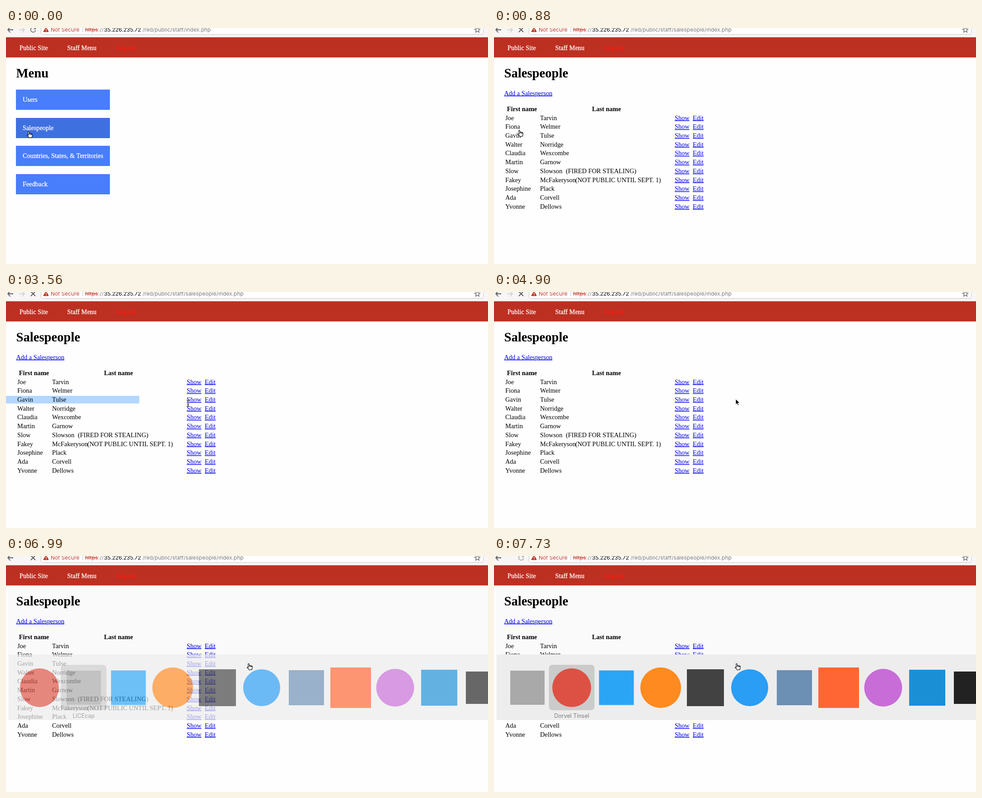
Recreate the animation shown at these times as an HTML page. Size 1067 by 525 pixels, loop 8000 ms.

```html
<!DOCTYPE html>
<html lang="en">
<head>
<meta charset="utf-8">
<title>Staff menu</title>
<style>
  html, body { margin: 0; width: 100%; height: 100%; overflow: hidden; background: #fefefe; }
  svg { display: block; width: 100vw; height: 100vh; }
  text { white-space: pre; }
  .page { font: 14.33px "Liberation Serif", serif; }
  .page .title { font-size: 28.67px; font-weight: bold; }
  .page .head { font-weight: bold; text-anchor: middle; }
  .page .link { fill: #00e; text-decoration: underline; }
  .page .bright { fill: #fff; stroke: #fff; stroke-width: .3px; }
  .bar { font: 12px Inter, sans-serif; }
  .label { font: 12.5px Inter, sans-serif; fill: #7d7d7d; text-anchor: middle; }
</style>
</head>
<body>
<svg id="stage" viewBox="0 0 1067 525" preserveAspectRatio="none"></svg>
<script>
const LOOP = 8000;
const stage = document.getElementById('stage');

function add(parent, tag, attrs = {}, content) {
  const el = document.createElementNS('http://www.w3.org/2000/svg', tag);
  for (const key in attrs) el.setAttribute(key, attrs[key]);
  if (content !== undefined) el.textContent = content;
  return parent.appendChild(el);
}
const group = (parent, attrs) => add(parent, 'g', attrs);
const write = (parent, x, y, content, attrs) => add(parent, 'text', { x, y, ...attrs }, content);
const rect = (parent, x, y, width, height, fill, attrs) =>
  add(parent, 'rect', { x, y, width, height, fill, ...attrs });
const line = (parent, d, stroke, width = 1.8) =>
  add(parent, 'path', { d, stroke, 'stroke-width': width, fill: 'none' });
const show = (el, visible) => el.setAttribute('visibility', visible ? 'inherit' : 'hidden');
const move = (el, x, y) => el.setAttribute('transform', `translate(${x} ${y})`);

rect(stage, 0, 0, 1067, 525, '#fefefe');
const tint = rect(stage, 4, 66, 1063, 299, '#fafafa');

// Browser toolbar
const bar = group(stage, { class: 'bar' });
rect(bar, 0, 0, 1067, 20, '#f6f6f6');
rect(bar, 0, 20, 1067, 1, '#c2b4b2');
rect(bar, 77.5, -10, 979, 24.5, '#fff', { rx: 3, stroke: '#c4c4c4' });
line(bar, 'M16 4H4M9.5-2L4 4l5.500 6', '#555');
const forward = line(bar, 'M29 4H41M35.500-2L41 4l-5.500 6', '#d0d0d0');
const reload = group(bar);
line(reload, 'M64.500 0.500A5.500 5.500 0 1 0 65.500 5', '#777');
add(reload, 'path', { d: 'M66-2V3H61Z', fill: '#777' });
const stop = line(bar, 'M55-1L65 9M65-1L55 9', '#555');
add(bar, 'path', { d: 'M88.500-3L95 9H82Z', fill: '#c53929' });
rect(bar, 88, 1, 1.3, 4, '#fff');
rect(bar, 88, 6.3, 1.3, 1.3, '#fff');
write(bar, 99, 8, 'Not Secure', { fill: '#c53929' });
rect(bar, 169, -3, 1, 13, '#bbb');
write(bar, 175, 8, 'https', { fill: '#c53929', 'text-decoration': 'line-through' });
write(bar, 204, 8, '://', { fill: '#777' });
write(bar, 217, 8, '35.226.235.72', { fill: '#000' });
const path = write(bar, 302, 8, '', { fill: '#777' });
line(bar, 'M1043.500-2l1.700 4 4.300.4-3.300 2.800 1 4.300-3.700-2.300-3.700 2.300 1-4.300-3.300-2.800 4.300-.4z', '#555', 1.2);

// Site navigation
const page = group(stage, { class: 'page' });
rect(page, 0, 21, 1067, 44.5, '#bc3022');
write(page, 30, 48.500, 'Public Site', { class: 'bright' });
write(page, 135.5, 48.500, 'Staff Menu', { class: 'bright' });
write(page, 244, 48.500, 'Log out', { fill: '#ff1a0d', stroke: '#ff1a0d', 'stroke-width': .3 });

// Menu view
const menu = group(page);
write(menu, 22.5, 110, 'Menu', { class: 'title' });
const buttons = ['Users', 'Salespeople', 'Countries, States, & Territories', 'Feedback'].map((name, i) => {
  const y = 137 + i * 62.7;
  const box = rect(menu, 22, Math.round(y), 208, 45, '#487dfc');
  write(menu, 37, y + 27, name, { class: 'bright' });
  return box;
});

// Salespeople view
const list = group(page);
const marks = [0, 1, 2, 3].map(() => rect(list, 0, 231, 0, 17, '#b3d7ff'));
write(list, 22.5, 110, 'Salespeople', { class: 'title' });
write(list, 22.5, 149.5, 'Add a Salesperson', { class: 'link' });
write(list, 62, 184.5, 'First name', { class: 'head' });
write(list, 249, 184.5, 'Last name', { class: 'head' });
const people = [
  'Joe Tarvin', 'Fiona Welmer', 'Gavin Tulse', 'Walter Norridge', 'Claudia Wexcombe', 'Martin Garnow',
  'Slow Slowson', 'Fakey McFakeryson', 'Josephine Plack', 'Ada Corvell', 'Yvonne Dellows'
];
const rowY = i => 204.5 + i * 19.72;
people.forEach((person, i) => {
  const [first, last] = person.split(' ');
  write(list, 25, rowY(i), first);
  write(list, 102, rowY(i), last);
  write(list, 400, rowY(i), 'Show', { class: 'link' });
  write(list, 440, rowY(i), 'Edit', { class: 'link' });
});
write(list, 159, rowY(6), '(FIRED FOR STEALING)');
write(list, 180, rowY(7), '(NOT PUBLIC UNTIL SEPT. 1)');

// App switcher
const panel = group(stage);
rect(panel, 6, 219, 1061, 146, '#ededed');
const highlight = rect(panel, 0, 242, 101, 101, '#cbcbcb', { rx: 8 });
const label = write(panel, 0, 359.5, '', { class: 'label' });
const disc = (x, r, fill) => add(panel, 'circle', { cx: x, cy: 293, r, fill });
const tile = (x, size, fill) => rect(panel, x - size / 2, 293 - size / 2, size, size, fill);
const browserIcon = disc(0, 43, '#dd5144');
const recorderIcon = tile(0, 76, '#a9a9a9');
tile(271, 77, '#2aa5f5');
disc(369, 45, '#ff8a1f');
tile(468, 82, '#424242');
disc(566, 41, '#2a9df4');
tile(665, 78, '#6c8fb4');
tile(763, 90, '#ff6633');
disc(861.5, 42, '#c86dd7');
tile(959, 80, '#1b8fd6');
tile(1054, 72, '#222');

// Pointers, each drawn around its own centre
const pointer = group(stage);
const hand = add(pointer, 'path', {
  d: 'M-2.500 0V-5.500Q-2.500-7-1.300-7T0-5.500V-2Q1.500-3 2.500-1.500 4-2.300 4.500-.8 6-1 6 .7V3Q5 5 4.500 7.300H-1.500Q-2.500 4.500-5.500 1.500-5.800-.8-2.500 1.500Z' +
     'M0-2V1M2.500-1.500V1.500M4.500-.8V1.800',
  fill: '#fff', stroke: '#000', 'stroke-width': 1.1, 'stroke-linejoin': 'round', transform: 'rotate(-8)'
});
const beam = group(pointer);
const beamPath = 'M-3-7Q0-7 0-5 0-7 3-7M0-5V5M-3 7Q0 7 0 5 0 7 3 7M-1.500 2H1.500';
line(beam, beamPath, '#fff', 2.6);
line(beam, beamPath, '#000', 1.1);
const arrow = add(pointer, 'path', {
  d: 'M-3-7V5.500L0 2.800 2 7.500 4 6.500 2 2H6Z', fill: '#000', stroke: '#fff', 'stroke-width': 1
});

const steps = (t, start, end, count) => {
  const done = Math.floor((t - start) / (end - start) * (count - 1) + .05) + 1;
  return Math.min(Math.max(done, 0), count) / count;
};

const moves = [
  { start: 150, end: 580, count: 4, to: [58, 234] },
  { start: 1170, end: 1920, count: 6, to: [28, 240] },
  { start: 2370, end: 3410, count: 8, to: [389, 248], power: 1.6 },
  { start: 3560, end: 4300, count: 6, to: [473, 246] },
  { start: 4750, end: 4900, count: 2, to: [538, 245] }
];

function pointerAt(t) {
  return moves.reduce(([x, y], m) => {
    const p = steps(t, m.start, m.end, m.count) ** (m.power || 1);
    return [x + (m.to[0] - x) * p, y + (m.to[1] - y) * p];
  }, [52, 237]);
}

// A cell is marked up to its text, then to its edge once the drag enters the next one
const cells = [[25, 61, 99], [102, 137, 397], [400, 433, 437], [440, 464, 464]];

function drawSelection(t, x) {
  const active = t >= 2370 && t < 4750;
  cells.forEach(([left, textEnd, edge], i) => {
    const next = cells[i + 1];
    const right = next && x > next[0] ? edge : Math.min(x - 5, textEnd);
    marks[i].setAttribute('width', active ? Math.max(0, right - left) : 0);
  });
}

function drawSwitcher(t) {
  const opening = t >= 6240 && t < 7430;
  const reopened = t >= 7730;
  const fade = [1, .68, .36, .12, 0][Math.round(steps(t, 6990, 7430, 4) * 4)];
  show(panel, opening || reopened);
  panel.setAttribute('opacity', reopened ? 1 : fade);
  const selectedX = t < 6390 ? 73.5 : 172;
  highlight.setAttribute('x', selectedX - 50.5);
  label.setAttribute('x', selectedX);
  label.textContent = t < 6390 || reopened ? 'Dorvel Tinsel' : 'LICEcap';
  move(browserIcon, reopened ? 172 : 74, 0);
  move(recorderIcon, reopened ? 74 : 172, 0);
}

function draw(t) {
  const loaded = t >= 880;
  const loading = t >= 440 && t < 7430;
  show(menu, !loaded);
  show(list, loaded);
  path.textContent = `/red/public/staff/${loaded ? 'salespeople/' : ''}index.php`;
  show(stop, loading);
  show(reload, !loading);
  reload.setAttribute('opacity', t >= 7430 ? .6 : 1);
  show(forward, t < 6990);
  show(tint, t >= 6990);
  buttons[1].setAttribute('fill', t < 150 ? '#3e70e0' : '#3a69d4');

  const [x, y] = pointerAt(t);
  const handBack = t >= 5490;
  move(pointer, handBack ? 539 : x, handBack ? 246 : y);
  show(hand, t < 1170 || handBack);
  show(beam, t >= 1170 && t < 4750);
  show(arrow, t >= 4750 && !handBack);
  drawSelection(t, x);
  drawSwitcher(t);
}

const begin = performance.now();
function tick() {
  draw((performance.now() - begin) % LOOP);
  requestAnimationFrame(tick);
}
tick();
</script>
</body>
</html>
```
